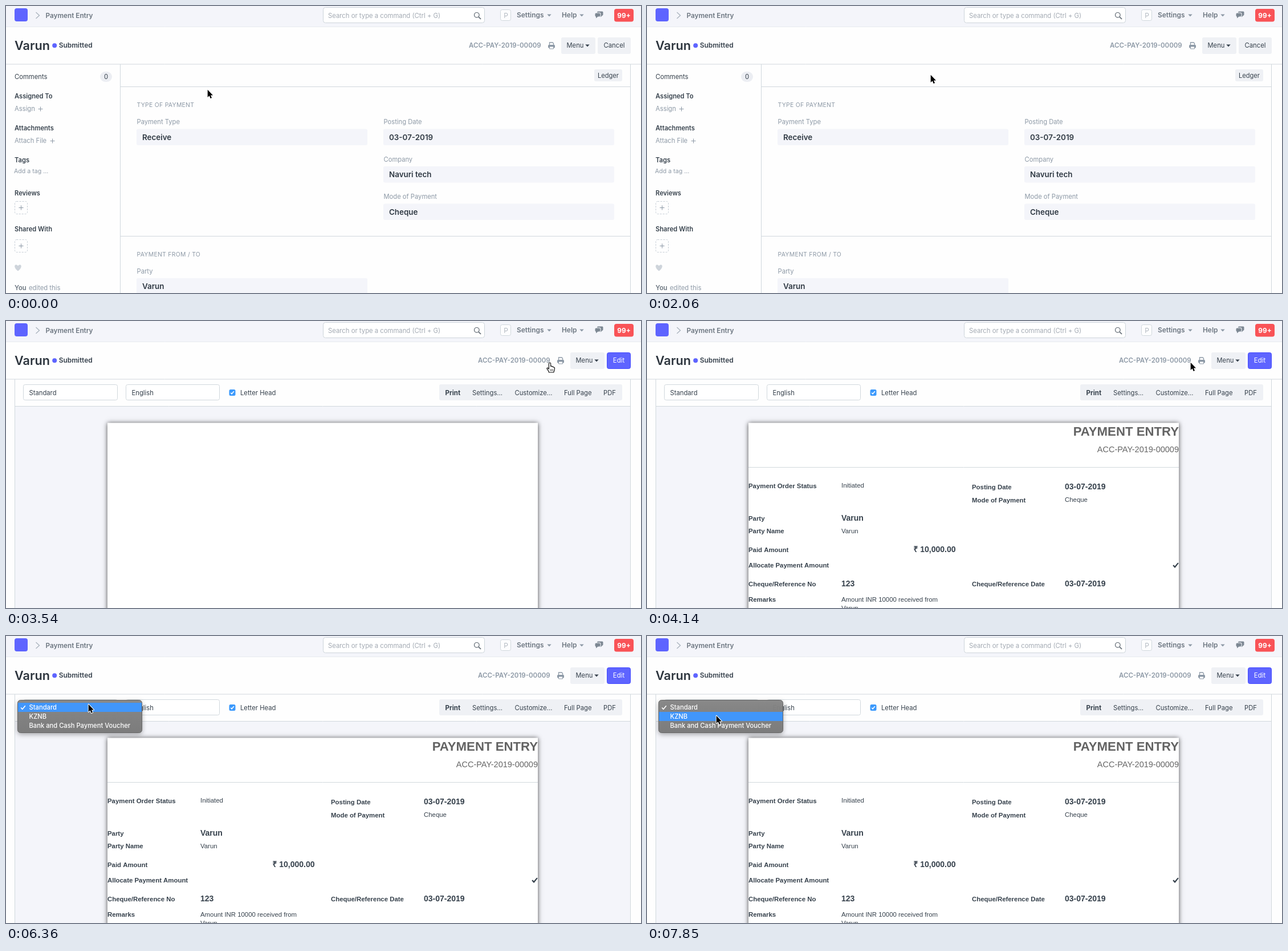
Animation, 1114 px wide and 503 px high, one loop 8 s. Source, as an HTML page with a canvas:

```html
<!DOCTYPE html>
<html lang="en">
<head>
<meta charset="utf-8">
<title>Payment Entry</title>
<style>
html, body { margin: 0; width: 100%; height: 100%; overflow: hidden; background: #fff; }
canvas { display: block; width: 1114px; height: 503px; }
</style>
</head>
<body>
<canvas id="stage"></canvas>
<script>
const W = 1114, H = 503, LOOP = 8000;
const canvas = document.getElementById('stage');
const ctx = canvas.getContext('2d');
const dpr = window.devicePixelRatio || 1;
canvas.width = W * dpr;
canvas.height = H * dpr;

const UI = 'Inter, "Open Sans", sans-serif';
const PRINT = '"Liberation Sans", Arial, sans-serif';
const DARK = '#36414c', GREY = '#8d99a6', NAV = '#6c7680', LINE = '#d1d8dd';
const PALE = '#f4f5fa', BUTTON = '#eff1f5', BRAND = '#5e64ff';
const PARTY = 'Varun', COMPANY = 'Navuri tech', BANK = 'KZNB';
const ID = 'ACC-PAY-2019-00009';

const PRINT_AT = 3540, LOADED_AT = 4140, OPEN_AT = 6360, BLINK = [7700, 7850];

// Pointer stops: time, x, y, hand
const STOPS = [
  [0, 353, 146], [740, 296, 143], [890, 250, 110], [1040, 172, 67],
  [1180, 123, 27, 1], [1330, 116, 21, 1], [1480, 114, 19, 1], [1620, 113, 18, 1],
  [1770, 113, 17, 1], [1920, 262, 62], [2060, 497, 120],
  [2360, 547, 112], [2510, 650, 111], [2660, 750, 110], [2800, 870, 86],
  [2950, 935, 76], [3100, 954, 73, 1], [4140, 953, 72],
  [4280, 760, 76], [4430, 430, 80], [4580, 268, 80],
  [5020, 271, 92], [5170, 273, 107], [5320, 273, 119], [5460, 252, 139],
  [5610, 214, 148], [5760, 178, 140], [5910, 154, 127], [6060, 144, 119],
  [7110, 139, 124], [7260, 128, 134], [7400, 121, 139]
];

// y is the middle of the capitals
function text(str, x, y, o = {}) {
  const { size = 11.25, weight = 400, color = DARK, font = UI, align = 'left', gap = 0 } = o;
  ctx.font = `${weight} ${size}px ${font}`;
  ctx.letterSpacing = gap + 'px';
  ctx.textAlign = align;
  ctx.fillStyle = color;
  ctx.fillText(str, x, y + size * 0.364);
}

function box(x, y, w, h, r, fill, stroke) {
  ctx.beginPath();
  ctx.roundRect(x, y, w, h, r);
  if (fill) { ctx.fillStyle = fill; ctx.fill(); }
  if (stroke) { ctx.strokeStyle = stroke; ctx.lineWidth = 1; ctx.stroke(); }
}

function lines(points, color, width = 1) {
  ctx.beginPath();
  points.forEach(([x, y], i) => i ? ctx.lineTo(x, y) : ctx.moveTo(x, y));
  ctx.strokeStyle = color;
  ctx.lineWidth = width;
  ctx.stroke();
}

const hline = (x1, x2, y, color = LINE) => lines([[x1, y], [x2, y]], color);
const vline = (x, y1, y2, color = LINE) => lines([[x, y1], [x, y2]], color);

function plus(x, y, r = 4) {
  hline(x - r, x + r, y, GREY);
  vline(x, y - r, y + r, GREY);
}

function caret(x, y, color) {
  ctx.beginPath();
  ctx.moveTo(x - 3.7, y - 2);
  ctx.lineTo(x + 3.7, y - 2);
  ctx.lineTo(x, y + 2);
  ctx.fillStyle = color;
  ctx.fill();
}

const tick = (x, y, s, color, width) =>
  lines([[x - 4 * s, y], [x - 1.3 * s, y + 3 * s], [x + 4 * s, y - 3.5 * s]], color, width);

function bubble(x, y, w, h, tail) {
  ctx.beginPath();
  ctx.roundRect(x, y, w, h, 1.5);
  ctx.moveTo(x + tail, y + h);
  ctx.lineTo(x + tail, y + h + 3);
  ctx.lineTo(x + tail + 3.5, y + h);
  ctx.fillStyle = '#7d8893';
  ctx.fill();
}

function navbar(hover) {
  ctx.fillStyle = PALE;
  ctx.fillRect(0, 0, W, 37);
  hline(0, W, 36.5, '#e8ebf0');
  box(15, 4, 23, 23, 4, BRAND);
  lines([[52.5, 11], [58.5, 16.5], [52.5, 22]], hover ? DARK : '#a9b3bd', hover ? 1.8 : 1.3);
  text('Payment Entry', 69.5, 16.8, { size: 11.75, weight: 600, color: hover ? '#26303a' : NAV });

  box(556.5, 2.5, 283, 27, 4, '#fff', '#cdd4da');
  text('Search or type a command (Ctrl + G)', 565, 16.8, { size: 11.3, color: '#a3aab3' });
  ctx.beginPath();
  ctx.arc(825.8, 15.8, 4.3, 0, Math.PI * 2);
  ctx.strokeStyle = '#5c666f';
  ctx.lineWidth = 1.2;
  ctx.stroke();
  lines([[829, 19], [833, 23]], '#5c666f', 1.7);

  box(867.5, 6.5, 18, 19, 3, '#fdfdfe', LINE);
  text('P', 877, 16.2, { size: 12, color: '#b3bac2', align: 'center' });
  text('Settings', 896, 16, { size: 11.9, weight: 600, color: NAV });
  caret(953, 16.5, GREY);
  text('Help', 975, 16, { size: 11.9, weight: 600, color: NAV });
  caret(1010, 16.5, GREY);
  bubble(1037, 9.5, 10.5, 7, 6);
  box(1032.5, 11.5, 11, 8, 2, PALE);
  bubble(1033.5, 12.5, 9, 6, 1.5);
  box(1067, 5, 34, 22.5, 4, '#f95357');
  text('99+', 1084, 16.3, { size: 11.8, weight: 700, color: '#fff', align: 'center' });
}

function printer(x, y) {
  box(x - 6, y - 1.5, 12, 5.5, 1.5, GREY);
  lines([[x - 3.5, y - 1.5], [x - 3.5, y - 5.5], [x + 2, y - 5.5], [x + 3.5, y - 4], [x + 3.5, y - 1.5]], GREY, 1.3);
  box(x - 3.5, y + 1.5, 7, 4, 0, '#fff', GREY);
}

function pageHead(printing) {
  const dx = printing ? 16 : 0;
  text(PARTY, 15, 69.5, { size: 21.6, weight: 600, color: '#2c343d' });
  ctx.beginPath();
  ctx.arc(85.2, 69.2, 4, 0, Math.PI * 2);
  ctx.fillStyle = BRAND;
  ctx.fill();
  text('Submitted', 92.7, 69, { size: 11.9, weight: 600 });
  text(ID, 812 + dx, 69, { size: 11.5, weight: 600, color: GREY });
  printer(957 + dx, 69.5);
  box(974 + dx, 55, 60, 29, 3, BUTTON);
  text('Menu', 983.5 + dx, 69, { size: 11.2 });
  caret(1020 + dx, 69.5, DARK);
  if (printing) {
    box(1054.5, 55.5, 41, 28, 3, BRAND, '#444bff');
    text('Edit', 1075, 69, { size: 11.4, color: '#fff', align: 'center' });
  } else {
    box(1038, 55, 58, 29, 3, BUTTON);
    text('Cancel', 1067, 69, { size: 11.3, align: 'center' });
  }
  hline(0, W, 102);
}

function addBox(y) {
  ctx.setLineDash([3, 2]);
  box(15.5, y + 0.5, 22, 22, 3, null, '#c6ced6');
  ctx.setLineDash([]);
  plus(26.5, y + 11.5);
}

function sidebar() {
  const label = (str, y) => text(str, 15, y, { size: 11.15, weight: 600 });
  text('Comments', 15, 124);
  box(165, 115, 21, 18, 9, '#eceef3');
  text('0', 175.5, 124, { align: 'center' });
  label('Assigned To', 158);
  text('Assign', 15, 180, { color: GREY });
  plus(60.5, 180.5);
  label('Attachments', 214);
  text('Attach File', 15, 236, { color: GREY });
  plus(81.5, 236.5);
  label('Tags', 270);
  text('Add a tag ...', 14, 289.5, { size: 10.6, color: GREY });
  label('Reviews', 328);
  addBox(342);
  label('Shared With', 391);
  addBox(409);
  ctx.beginPath();
  ctx.moveTo(21, 464.5);
  ctx.bezierCurveTo(11, 457, 16, 450, 21, 455.5);
  ctx.bezierCurveTo(26, 450, 31, 457, 21, 464.5);
  ctx.fillStyle = '#ced4db';
  ctx.fill();
  text('You', 15, 494, { weight: 600, color: NAV });
  text('edited this', 40, 494, { color: GREY });
}

function field(label, value, x, y) {
  text(label, x, y, { size: 11.2, color: GREY });
  box(x - 0.5, y + 12.5, 405, 28.5, 3, PALE);
  text(value, x + 9.5, y + 27, { size: 13.4, weight: 600, color: '#2f3943' });
}

function formView() {
  sidebar();
  vline(200.5, 102, H);
  vline(1095.5, 102, H);
  hline(201, 1095, 141.5);
  hline(201, 1095, 403.5);
  box(1032, 111, 49, 21, 3, BUTTON);
  text('Ledger', 1056.5, 121.5, { size: 11.1, align: 'center' });
  const heading = { size: 10.4, color: GREY, gap: 0.3 };
  text('TYPE OF PAYMENT', 229.5, 173, heading);
  text('PAYMENT FROM / TO', 229.5, 435, heading);
  field('Payment Type', 'Receive', 229.5, 203);
  field('Posting Date', '03-07-2019', 662.5, 203);
  field('Company', COMPANY, 662.5, 268.5);
  field('Mode of Payment', 'Cheque', 662.5, 334);
  field('Party', PARTY, 229.5, 464.5);
}

function paper(loaded) {
  ctx.save();
  ctx.shadowColor = 'rgba(0,0,0,.7)';
  ctx.shadowBlur = 8 * dpr;
  ctx.fillStyle = '#fff';
  ctx.fillRect(178, 178.5, 755, 400);
  ctx.restore();
  if (!loaded) return;

  const label = (str, x, y) => text(str, x, y, { font: PRINT, size: 11.4, weight: 700 });
  const plain = (str, x, y) => text(str, x, y, { font: PRINT, size: 11.4 });
  const big = (str, x, y, align) => text(str, x, y, { font: PRINT, size: 14, weight: 700, align });
  text('PAYMENT ENTRY', 933, 192.7, { font: PRINT, size: 22.2, weight: 700, color: '#636363', align: 'right' });
  text(ID, 933, 225.2, { font: PRINT, size: 14.5, color: '#666', align: 'right' });
  hline(178, 933, 256.5);
  label('Payment Order Status', 178, 288.8);
  plain('Initiated', 341, 288);
  label('Posting Date', 570, 290.8);
  big('03-07-2019', 733, 290.3);
  label('Mode of Payment', 570, 313.4);
  plain('Cheque', 733, 312.8);
  label('Party', 178, 345.8);
  big(PARTY, 341, 345.3);
  label('Party Name', 178, 368.3);
  plain(PARTY, 341, 367.8);
  label('Paid Amount', 178, 400.8);
  big('₹ 10,000.00', 541.5, 400.3, 'right');
  label('Allocate Payment Amount', 178, 428.3);
  tick(927.5, 428, 1.1, DARK, 2.2);
  label('Cheque/Reference No', 178, 460.8);
  big('123', 341, 460.3);
  label('Cheque/Reference Date', 570, 460.8);
  big('03-07-2019', 733, 460.3);
  label('Remarks', 178, 488.3);
  plain('Amount INR 10000 received from', 341, 487.8);
  plain(PARTY, 341, 502.8);
}

function printView(loaded) {
  ctx.fillStyle = PALE;
  ctx.fillRect(16, 150, 1079, H - 150);
  vline(15.5, 102, H);
  vline(1095.5, 102, H);
  hline(16, 1095, 149.5);
  box(30.5, 111.5, 165, 27, 3, '#fff', LINE);
  text('Standard', 40.5, 125.5);
  box(210.5, 111.5, 164, 27, 3, '#fff', LINE);
  text('English', 220.5, 125.5);
  box(391.5, 120, 11, 11, 2.5, '#3b99fc');
  tick(397, 125.7, 0.7, '#fff', 1.5);
  text('Letter Head', 411, 125.5);
  box(760, 111, 321, 28, 3, BUTTON);
  text('Print', 770.5, 125.5, { size: 11.5, weight: 700 });
  text('Settings...', 818, 125.5);
  text('Customize...', 892.5, 125.5);
  text('Full Page', 979, 125.5);
  text('PDF', 1048, 125.5);
  paper(loaded);
}

function dropdown(active) {
  ctx.save();
  ctx.shadowColor = 'rgba(0,0,0,.35)';
  ctx.shadowBlur = 9 * dpr;
  ctx.shadowOffsetY = 3 * dpr;
  const fill = ctx.createLinearGradient(0, 112, 0, 170);
  fill.addColorStop(0, 'rgba(134,134,134,.96)');
  fill.addColorStop(1, 'rgba(122,122,122,.96)');
  box(20.5, 112.5, 218, 57, 5, fill);
  ctx.restore();
  box(20.5, 112.5, 218, 57, 5, null, '#666');
  if (active >= 0) {
    ctx.fillStyle = '#4196fa';
    ctx.fillRect(21, 117 + active * 16, 217, 16);
  }
  tick(30, 125.5, 0.95, '#fff', 1.6);
  ['Standard', BANK, 'Bank and Cash Payment Voucher'].forEach((str, i) =>
    text(str, 40.5, 125.3 + i * 16, { size: 11.2, weight: 500, color: '#fff' }));
}

const ARROW = new Path2D('M0 0V13.2L3 10.4L5 15.2L7.3 14.2L5.3 9.6H9.3Z');
const HAND = new Path2D('M-1.6 1.6Q-1.5 0 0 0Q1.5 0 1.6 1.6V6.3Q3.6 5.6 4.2 7.1' +
  'Q6 6.5 6.6 8.1Q8.5 7.8 8.5 10L8 13.3L6.8 17H-1.6L-2.3 14.6L-5 10.6Q-5.3 8.8 -3.6 9.1L-1.6 11Z');
const CREASE = new Path2D('M1.2 11.5V14.5M3.2 11.5V14.5M5.2 11.5V14.5');

function pointer(x, y, hand) {
  ctx.save();
  ctx.lineJoin = 'round';
  if (hand) {
    ctx.translate(x, y);
    ctx.fillStyle = '#fff';
    ctx.strokeStyle = '#111';
    ctx.lineWidth = 1.2;
    ctx.fill(HAND);
    ctx.stroke(HAND);
    ctx.lineWidth = 0.8;
    ctx.stroke(CREASE);
  } else {
    ctx.translate(x + 0.7, y + 0.8);
    ctx.strokeStyle = '#fff';
    ctx.lineWidth = 2;
    ctx.stroke(ARROW);
    ctx.fillStyle = '#000';
    ctx.fill(ARROW);
  }
  ctx.restore();
}

function draw(t) {
  const [, x, y, hand] = STOPS.findLast(stop => stop[0] <= t);
  const printing = t >= PRINT_AT;
  ctx.setTransform(dpr, 0, 0, dpr, 0, 0);
  ctx.fillStyle = '#fefefe';
  ctx.fillRect(0, 0, W, H);
  navbar(hand && y < 37);
  pageHead(printing);
  if (printing) printView(t >= LOADED_AT);
  else formView();
  if (t >= OPEN_AT) {
    const blinking = t >= BLINK[0] && t < BLINK[1];
    dropdown(blinking ? -1 : Math.floor((y - 117) / 16));
  }
  pointer(x, y, hand);
}

const start = performance.now();
function frame() {
  draw((performance.now() - start) % LOOP);
  requestAnimationFrame(frame);
}
frame();
</script>
</body>
</html>
```
